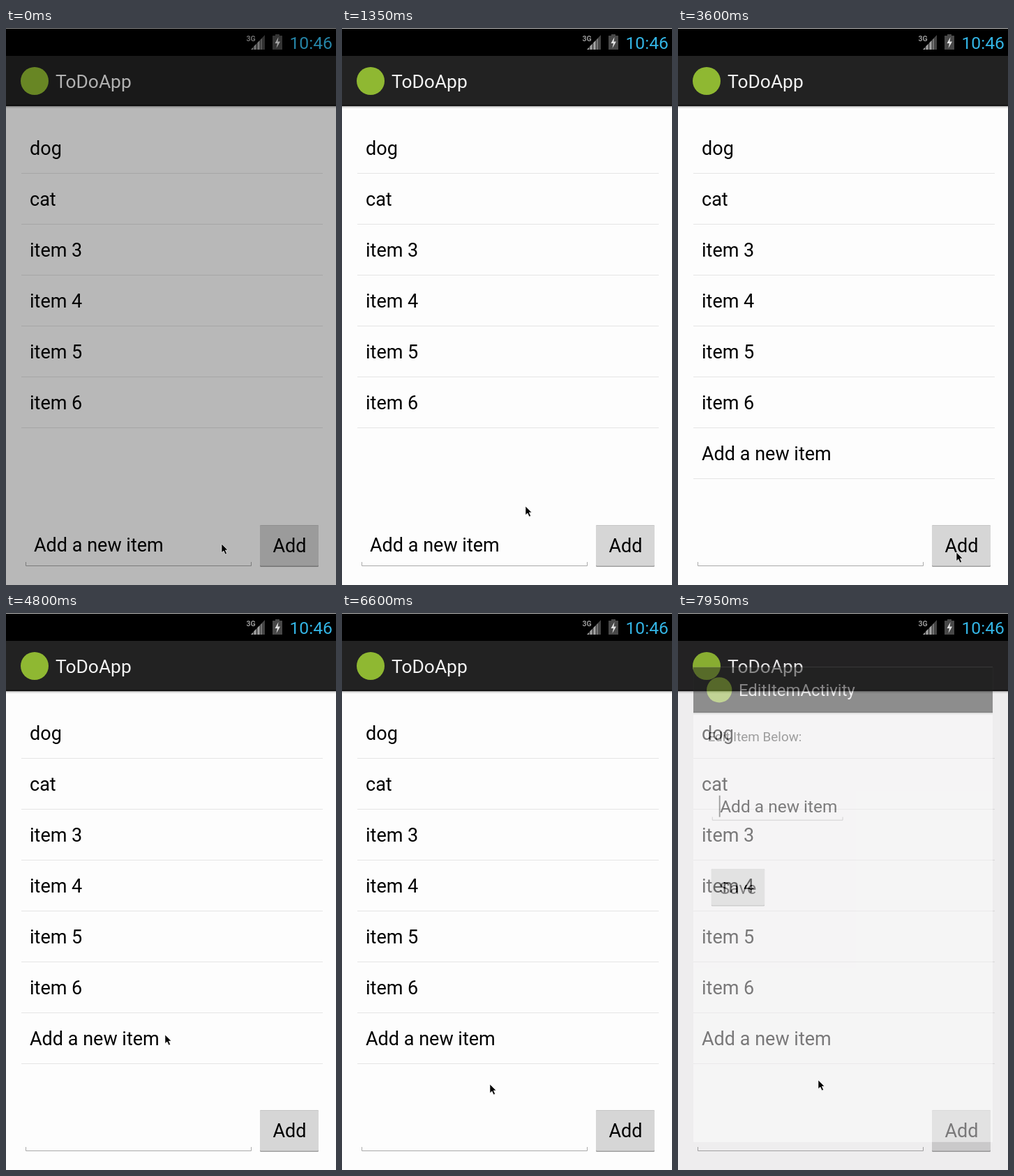
An HTML page for the animation above (8000 ms loop, 473 px wide and 799 px high).

```html
<!DOCTYPE html>
<html lang="en">
<head>
<meta charset="utf-8">
<title>ToDoApp</title>
<style>
  html, body { margin: 0; width: 100%; height: 100%; overflow: hidden; background: #fdfdfd; }
  svg { display: block; width: 100vw; height: 100vh; }
  text { font: 27px Roboto, sans-serif; fill: #000; white-space: pre; }
  .title { font-size: 26.4px; fill: #f3f3f3; }
  .bar { fill: #222; }
  .divider { fill: #e5e5e5; }
  .line { fill: none; stroke: #a9a9a9; }
  .middle { text-anchor: middle; }
  .clock { font-size: 24.7px; fill: #33b5e5; }
  .net { font-size: 10.5px; font-weight: 700; fill: #999; }
  .label { font-size: 20.8px; fill: #444; }
</style>
</head>
<body>
<svg viewBox="0 0 473 799" preserveAspectRatio="none">
  <defs>
    <g id="header">
      <rect class="bar" y="40" width="473" height="72"/>
      <rect y="110" width="473" height="2" fill="#151515"/>
      <rect y="112" width="473" height="1" fill="#a8a8a8"/>
      <rect y="113" width="473" height="2" fill="#e3e3e3"/>
      <circle cx="41" cy="76" r="20" fill="#8fb832"/>
    </g>
  </defs>

  <g id="main">
    <rect width="473" height="799" fill="#fdfdfd"/>
    <use href="#header"/>
    <text class="title" x="71" y="86">ToDoApp</text>
    <g id="list"></g>
    <text id="draft" x="40" y="751">Add a new item</text>
    <path class="line" d="M28.5 766v5.5h323V766"/>
    <rect id="glow" x="361" y="710" width="90" height="66" rx="3" fill="#33b5e5" opacity=".3"/>
    <rect x="364" y="713" width="84" height="60" rx="1.5" fill="#a0a0a0"/>
    <rect id="add" x="364" y="713" width="84" height="58.5" rx="1.5"/>
    <rect x="365" y="713" width="82" height="1" fill="#c6c6c6"/>
    <text class="middle" x="406.5" y="752">Add</text>
  </g>

  <rect id="tint" y="40" width="473" height="759" fill="#302030"/>

  <g id="edit">
    <rect y="40" width="473" height="751" fill="#fdfdfd"/>
    <use href="#header"/>
    <text class="title" x="71.5" y="86">EditItemActivity</text>
    <text class="label" x="22.5" y="157.5">Edit Item Below:</text>
    <path class="line" d="M30 277v5h206v-5"/>
    <rect x="40.5" y="243" width="2" height="34" fill="#444"/>
    <text x="42" y="270">Add a new item</text>
    <rect x="28.5" y="359" width="84" height="59" rx="1.5" fill="#a0a0a0"/>
    <rect x="28.5" y="359" width="84" height="57.5" rx="1.5" fill="#d6d6d6"/>
    <text class="middle" x="70.5" y="399">Save</text>
  </g>

  <g id="status">
    <rect width="473" height="40"/>
    <rect width="473" height="1" fill="#bdbdbd"/>
    <text class="net" x="344.5" y="18.5">3G</text>
    <path d="M351 31L371 10V31Z" fill="#444"/>
    <path d="M351 31l3-3v3zM355.500 31v-5l3-3v8zM360.500 31V21l3-3v13zM365.500 31V16l1-1v16z" fill="#a5a5a5"/>
    <path d="M386 9h6v2h4v20h-14V11h4z" fill="#484848"/>
    <path d="M390.500 13l-5 9h3.500l-1.500 7 5.500-9.500h-3.500z" fill="#e2e2e2"/>
    <text class="clock" x="406.500" y="30">10:46</text>
  </g>

  <rect id="dim" width="473" height="799"/>
  <path id="pointer" d="M0 0V12.500L3 10l2.300 5 2.200-1L5.300 9H9Z" stroke="#fff" stroke-width=".6"/>
</svg>
<script>
  const LOOP = 8000, TICK = 150;
  const $ = id => document.getElementById(id);
  const set = (id, attrs) => {
    for (const k in attrs) $(id).setAttribute(k, attrs[k]);
  };
  const clamp = v => Math.max(0, Math.min(1, v));

  const items = ['dog', 'cat', 'item 3', 'item 4', 'item 5', 'item 6', 'Add a new item'];
  $('list').innerHTML = items.map((label, i) => {
    const y = 208 + i * 73;
    const last = i === items.length - 1;
    const press = last ? `<rect id="press" x="22" y="${y - 72}" width="432" height="72" fill="#a8dff4"/>` : '';
    return `<g ${last ? 'id="added"' : ''}>${press}
      <rect class="divider" x="22" y="${y}" width="432" height="1"/>
      <text x="34" y="${y - 26}">${label}</text></g>`;
  }).join('');

  // time, x, y of the pointer tip
  const path = [
    [0, 309, 740], [150, 309, 740], [1050, 335, 777], [1350, 263, 686],
    [1650, 139, 541], [1800, 139, 541], [2100, 97, 341], [2250, 100, 350],
    [2850, 376, 706], [3000, 399, 752], [3900, 399, 752], [4650, 230, 610],
    [4800, 228, 605], [4950, 228, 605], [5100, 226, 612], [5550, 226, 613],
    [5850, 213, 678], [6300, 213, 678], [6600, 212, 676], [7050, 201, 670],
    [8000, 201, 670]
  ];

  function pointerAt(t) {
    const i = path.findIndex(p => p[0] > t);
    const [t0, x0, y0] = path[i - 1], [t1, x1, y1] = path[i];
    const k = (t - t0) / (t1 - t0);
    return [x0 + (x1 - x0) * k, y0 + (y1 - y0) * k];
  }

  function draw(now) {
    const t = Math.floor(now % LOOP / TICK) * TICK;
    const added = t >= 3600;
    const pressed = t === 3450;
    const open = clamp((t - 6600) / 1350);
    const scale = 0.8 + 0.107 * open;
    const show = on => on ? 'inline' : 'none';

    set('pointer', { transform: `translate(${pointerAt(t)})` });
    set('dim', { opacity: 0.275 * clamp(1 - t / 750) });
    set('added', { display: show(added) });
    set('draft', { display: show(!added) });
    set('glow', { display: show(pressed) });
    set('add', { fill: pressed ? '#8fd0e8' : '#d6d6d6' });
    set('press', { display: show(t === 5400) });
    set('tint', { opacity: 0.07 * open });
    set('edit', {
      opacity: 0.47 * open,
      transform: `translate(237 445) scale(${scale}) translate(-237 -445)`
    });
  }

  function loop() {
    draw(performance.now());
    requestAnimationFrame(loop);
  }
  loop();
</script>
</body>
</html>
```
